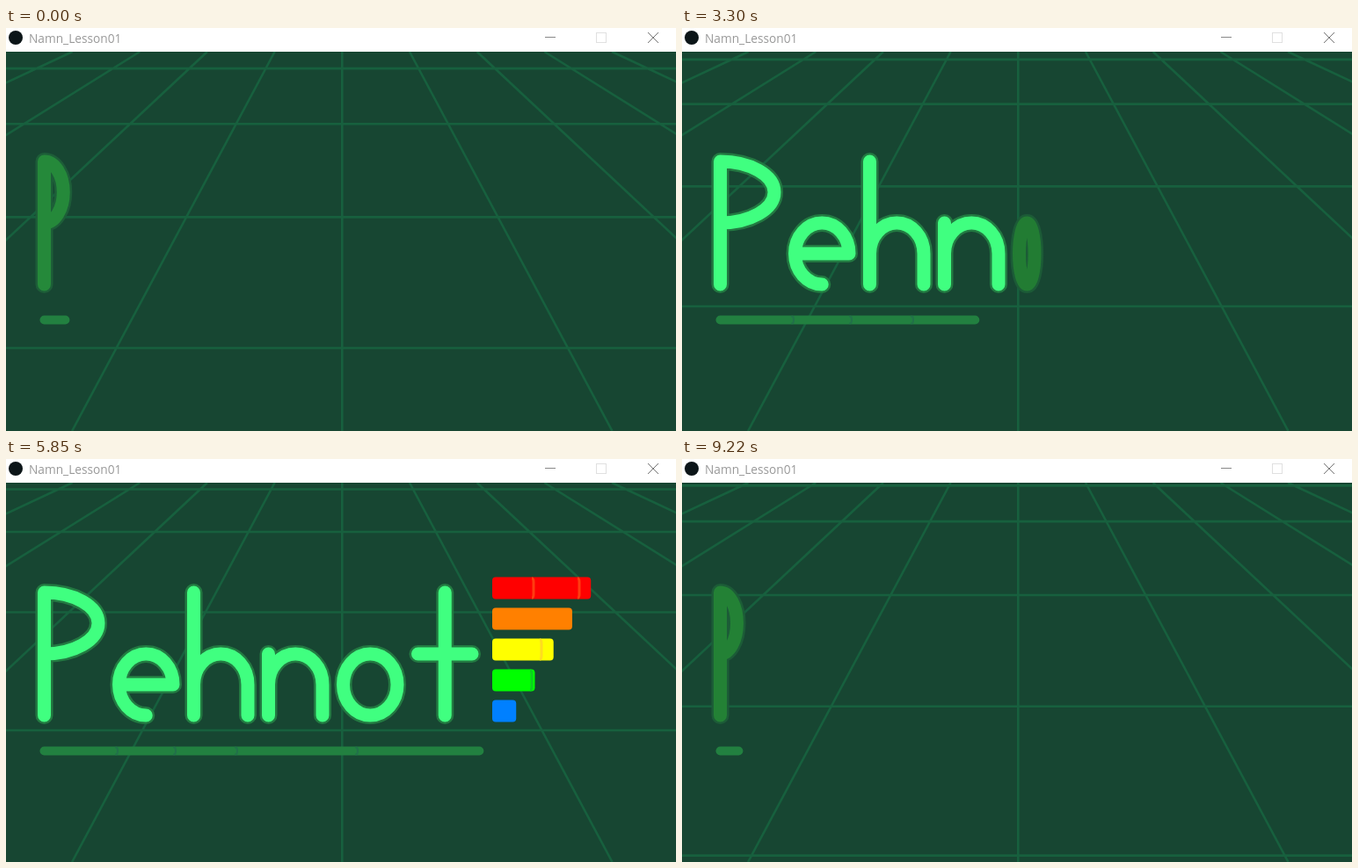
Recreate the animation shown at these times as an HTML page with a canvas. Size 762 px wide and 459 px high, loop 9260 ms.

```html
<!DOCTYPE html>
<html lang="sv">
<head>
<meta charset="utf-8">
<title>Namn_Lesson01</title>
<style>
  html, body { margin: 0; width: 100%; height: 100%; overflow: hidden; background: #174632; }
  canvas { position: absolute; left: 0; top: 0; }
  header { position: absolute; left: 0; top: 0; width: 762px; height: 27px; background: #fff; }
  header span { position: absolute; left: 26px; top: 2px; color: #999;
    font: 13.7px/20px "Open Sans", "Noto Sans", sans-serif; white-space: nowrap; }
  header svg { position: absolute; left: 0; top: 0; }
</style>
</head>
<body>
<canvas id="stage" width="762" height="459"></canvas>
<header>
  <svg width="762" height="27" fill="none">
    <circle cx="11" cy="11" r="8" fill="#0c1518"/>
    <path d="M613 10.5h12" stroke="#888"/>
    <rect x="671.5" y="5.5" width="11" height="11" stroke="#e0e0e0"/>
    <path d="M730 5l12 12M742 5l-12 12" stroke="#777"/>
  </svg>
  <span>Namn_Lesson01</span>
</header>
<script>
const W = 762, H = 459, TOP = 27;
const LOOP = 9260, STEP = 47.37, LAST_STEP = 195;
const SLOT = 17.8, CYCLE = 11 * SLOT, LEAD = 6.3;   // all in steps
const ctx = document.getElementById('stage').getContext('2d');
const clamp = v => Math.max(0, Math.min(1, v));
const mix = (a, b, p) => a.map((v, i) => Math.round(v + (b[i] - v) * p));

// Letter shapes: x runs 0..1 over the letter width, y is in stage pixels.
const stem = (x, y) => (p, at) => { p.moveTo(at(x), y); p.lineTo(at(x), 292); };
const bar = y => (p, at) => { p.moveTo(at(0), y); p.lineTo(at(1), y); };
const leg = (p, at) => { p.moveTo(at(1), 257); p.lineTo(at(1), 292); };
const arc = (cx, cy, rx, from, to, ccw = false) => (p, at) => {
  const r = at(rx) - at(0), a = from * Math.PI;
  p.moveTo(at(cx) + r * Math.cos(a), cy + 35 * Math.sin(a));
  p.ellipse(at(cx), cy, r, 35, 0, a, to * Math.PI, ccw);
};
const arch = arc(.5, 257, .5, 1, 2);

const GLYPHS = {
  P: [stem(0, 152), arc(0, 187, 1, -.5, .5)],
  e: [bar(257), arc(.5, 257, .5, 0, .5, true)],
  h: [stem(0, 152), arch, leg],
  n: [stem(0, 222), arch, leg],
  o: [arc(.5, 257, .5, 0, 2)],
  t: [bar(222), stem(.5, 152)],
};
const WORD = 'Pehnot';

// Each bar: colour, then seams left behind by its moving edge.
const BARS = [
  ['#ff0000', [600, '#ff3c10'], [652, '#ff3c10']],
  ['#ff8000'],
  ['#ffff00', [609, '#ffdc20'], [653, '#ff9a20']],
  ['#00ff00', [598, '#0cd020'], [641, '#0cd020'], [675, '#10b820'], [684, '#10c820'], [692, '#10b820']],
  ['#0080ff', [704, '#40909a']],
];
const LINE_SEAMS = [127, 193, 263, 400, 548];

function drawGrid(step) {
  ctx.fillStyle = '#174632';
  ctx.fillRect(0, 0, W, H);
  ctx.strokeStyle = '#17603e';
  ctx.lineWidth = 2.6;
  ctx.lineCap = 'butt';
  ctx.beginPath();
  for (let k = -5; k <= 5; k++) {
    ctx.moveTo(382.3 + 76.7 * k, TOP);
    ctx.lineTo(382.3 + 307.2 * k, H);
  }
  const phase = (.968 + .11016 * step) % 1;
  for (let k = phase; k < 5; k++) {
    const y = 26 + 21.5 * k * k;
    ctx.moveTo(0, y);
    ctx.lineTo(W, y);
  }
  ctx.stroke();
}

function drawLetter(char, i, p) {
  if (p <= 0) return;
  const x = 43.5 + 85 * i, at = u => x + u * 61.5 * p;
  const rgb = mix([22, 72, 20], [64, 255, 128], p);
  ctx.beginPath();
  GLYPHS[char].forEach(part => part(ctx, at));
  ctx.lineCap = ctx.lineJoin = 'round';
  ctx.lineWidth = 20;
  ctx.strokeStyle = `rgb(${mix([25, 78, 50], [35, 122, 66], p)})`;
  ctx.stroke();
  ctx.lineWidth = 15;
  ctx.strokeStyle = `rgb(${rgb})`;
  ctx.stroke();
}

function drawSeam(x, y, h, color) {
  ctx.strokeStyle = color;
  ctx.beginPath();
  ctx.moveTo(x - 2, y - h);
  ctx.quadraticCurveTo(x, y - h, x, y - h + 4);
  ctx.lineTo(x, y + h - 4);
  ctx.quadraticCurveTo(x, y + h, x - 2, y + h);
  ctx.stroke();
}

function drawBar([color, ...seams], i, p) {
  if (p <= 0) return;
  const y = 147 + 35 * i, width = 170 * p;
  ctx.fillStyle = color;
  ctx.beginPath();
  ctx.roundRect(553, y - 12.5, width, 25, Math.min(4, width / 2));
  ctx.fill();
  ctx.lineCap = 'butt';
  ctx.lineWidth = 3;
  seams.filter(([x]) => x + 2 < 553 + width)
    .forEach(([x, tint]) => drawSeam(x, y, 11, tint));
}

function drawUnderline(p) {
  const end = 43.5 + 676 * p;
  ctx.strokeStyle = '#228040';
  ctx.lineWidth = 10;
  ctx.lineCap = 'round';
  ctx.beginPath();
  ctx.moveTo(43.5, 332.5);
  ctx.lineTo(end, 332.5);
  ctx.stroke();
  ctx.lineWidth = 2;
  LINE_SEAMS.filter(x => x < end).forEach(x => drawSeam(x, 332.5, 4, '#22704a'));
}

function draw(now) {
  const time = now % LOOP;
  const step = Math.min(LAST_STEP, Math.floor((time + 27) / STEP));
  const slot = ((step + LEAD) % CYCLE) / SLOT;
  drawGrid(step);
  drawUnderline(clamp(slot / 10));
  [...WORD].forEach((char, i) => drawLetter(char, i, clamp(slot - i)));
  BARS.forEach((row, i) => drawBar(row, i, clamp((slot - 6 - i / 4) / 2)));
}

const start = performance.now();
function tick() {
  draw(performance.now() - start);
  requestAnimationFrame(tick);
}
tick();
</script>
</body>
</html>
```
